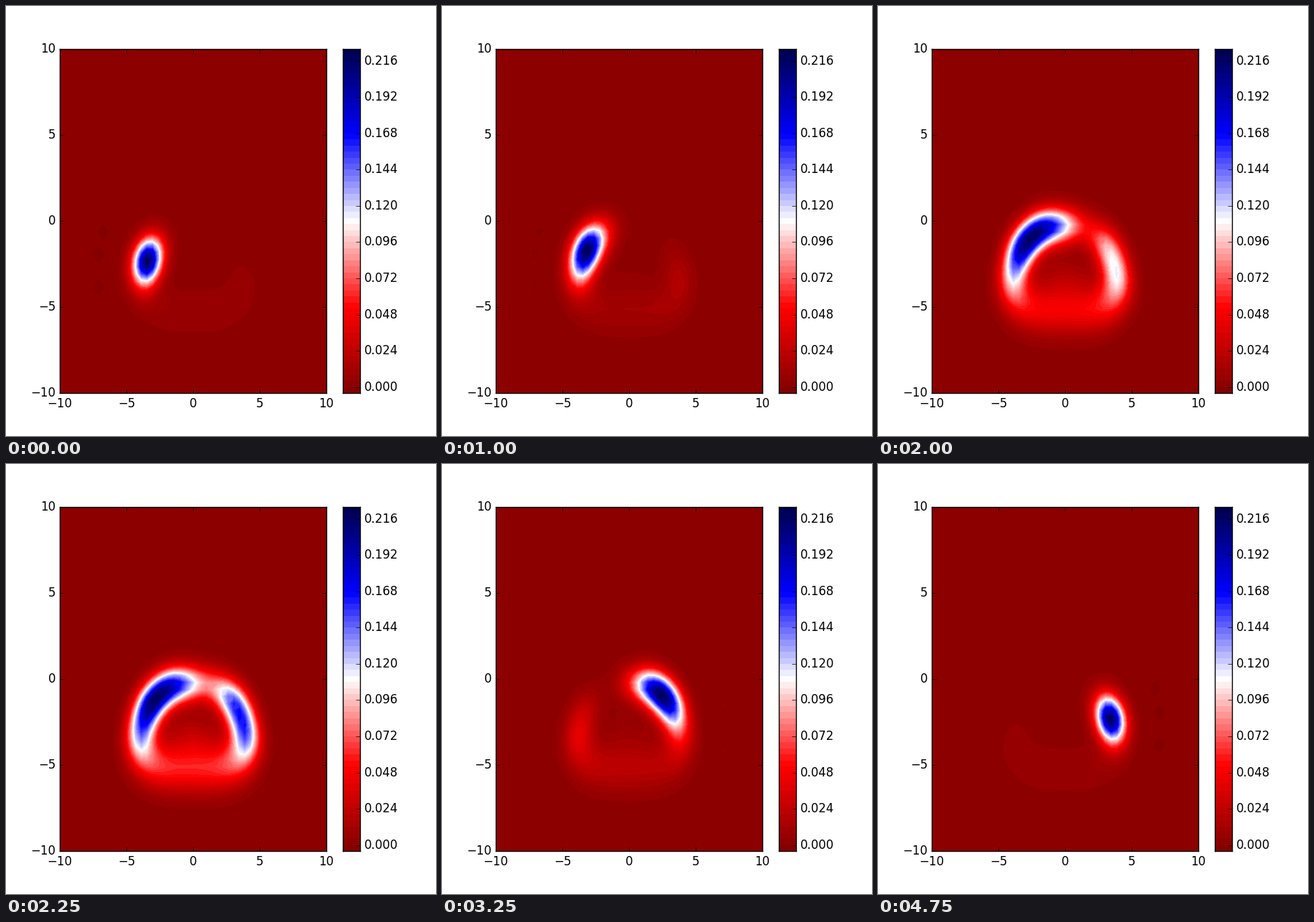
These frames come from a looping animation (600x600 px, 5 s). A matplotlib script:

```python
import numpy as np
import matplotlib.pyplot as plt
from matplotlib.animation import FuncAnimation

plt.rcParams.update({
    "font.family": "DejaVu Sans", "font.size": 12, "axes.linewidth": 1.0,
    "xtick.direction": "in", "ytick.direction": "in",
    "xtick.major.size": 4, "ytick.major.size": 4,
    "xtick.major.width": 0.5, "ytick.major.width": 0.5,
    "xtick.major.pad": 4, "ytick.major.pad": 4,
    "xtick.top": True, "ytick.right": True,
    "ytick.alignment": "center", "text.kerning_factor": 6,
})

FRAMES, INTERVAL = 20, 250
STEP, PEAK = 0.004, 0.2225
LEVELS = STEP * np.arange(-1, 57)
MIDS = (LEVELS[:-1] + LEVELS[1:]) / 2
SPAN = dict(vmin=LEVELS[0], vmax=LEVELS[-1], cmap="seismic_r")

axis = np.linspace(-10, 10, 50)
X, Y = np.meshgrid(axis, axis)

# Ridge of the ring: left half from the top to the bottom, then mirrored
HALF = np.array([(0, -.25), (-.6, -.25), (-1.4, -.32), (-2.1, -.67),
                 (-2.9, -1.3), (-3.4, -2.2), (-3.77, -3.25), (-3.8, -3.9),
                 (-3.45, -4.65), (-2.3, -5.2), (-1, -5.3), (0, -5.3)])
loop = np.vstack([HALF, HALF[-2::-1] * (-1, 1)])
arc = np.r_[0, np.cumsum(np.hypot(*np.diff(loop, axis=0).T))]
LENGTH = arc[-1]
U = np.linspace(0, LENGTH, 240, endpoint=False)
RX, RY = np.interp(U, arc, loop[:, 0]), np.interp(U, arc, loop[:, 1])
WIDTH = 0.7 + 0.24 / (1 + np.exp((RY + 4.4) / 0.3))

# Shape of the distribution at a few moments of the sweep
KEYS = [0, 4, 6, 8, 9]
SHAPE = {
    "wide": [1, 1.02, 1.03, 1.06, 1.07],
    "pos": [4.35, 3.7, 2.6, 3.1, 3.3],
    "up": [.95, 1.45, 2.0, 3.7, 3.8],
    "down": [.95, 1.45, 2.1, 2.4, 2.5],
    "power": [2, 2, 2.2, 3.1, 3.1],
    "lobe": [.0002, .011, .034, .11, .175],
    "lobe_pos": [5.2, 4.9, 4.6, 4.0, 3.8],
    "lobe_up": [1.4, 1.5, 1.6, 1.75, 2.1],
    "lobe_down": [1.8, 2.0, 2.2, 2.5, 2.5],
    "bridge": [.0068, .0105, .019, .045, .055],
    "fill": [.0001, .003, .008, .018, .024],
    "ripple": [.0035, .002, .0015, .0002, .0001],
}
LOGS = {"lobe", "bridge", "fill"}
RIPPLES = [(-7.1, -3.85), (-7.1, -1.95), (-6.73, -.62)]


def shape_at(k):
    return {name: np.exp(np.interp(k, KEYS, np.log(v))) if name in LOGS
            else np.interp(k, KEYS, v) for name, v in SHAPE.items()}


def bump(d, up, down, power):
    """Sharp towards the top of the ring (d < 0), long-tailed below."""
    d = (d + LENGTH / 2) % LENGTH - LENGTH / 2
    return np.where(d < 0, np.exp(-np.abs(d / up) ** power),
                    np.exp(-np.abs(d / down) ** 1.75))


def ramp(t):
    return 1 / (1 + np.exp(-t / 0.4))


def spot(x, y, sx, sy):
    return np.exp(-((X - x) / sx) ** 2 / 2 - ((Y - y) / sy) ** 2 / 2)


def ring(weight, wide):
    dx, dy = X[..., None] - wide * RX, Y[..., None] - RY
    kernel = np.exp(-(dx ** 2 + dy ** 2) / (2 * WIDTH ** 2))
    return kernel @ (weight / WIDTH) * LENGTH / len(U) / np.sqrt(2 * np.pi)


def density(k):
    if k >= FRAMES // 2:
        return density(FRAMES - 1 - k)[:, ::-1]
    s = shape_at(k)
    main = ring(bump(U - s["pos"], s["up"], s["down"], s["power"]), s["wide"])
    lobe = bump(LENGTH - U - s["lobe_pos"], s["lobe_up"], s["lobe_down"], 2.8)
    bridge = ramp(U - 5.7) * ramp(LENGTH - U - 5)
    z = PEAK * main / main.max()
    z += ring(s["lobe"] * lobe + s["bridge"] * bridge, s["wide"])
    z += s["fill"] * spot(0, -3.6, 1.5, 1.0)
    z *= (PEAK - 0.001) / z.max()
    for x, y in RIPPLES:
        z -= s["ripple"] * spot(x, y, 0.28, 0.28)
    return z + 0.001


fig = plt.figure(figsize=(6, 6), dpi=100, facecolor="white")
ax = fig.add_axes([0.125, 0.1, 0.62, 0.8])
cax = fig.add_axes([0.78375, 0.1, 0.04, 0.8])

cax.pcolormesh([0, 1], LEVELS, MIDS[:, None], **SPAN)
cax.set(xlim=(0, 1), ylim=(LEVELS[0], LEVELS[-1]), xticks=[])
ticks = 0.024 * np.arange(10)
cax.set_yticks(ticks, [f"{t:.3f}" for t in ticks])
cax.tick_params(axis="y", left=False, right=True,
                labelleft=False, labelright=True)

shown = []


def draw(k):
    while shown:
        shown.pop().remove()
    shown.append(ax.contourf(X, Y, density(k), levels=LEVELS, **SPAN))
    ax.set(xlim=(-10, 10), ylim=(-10, 10),
           xticks=range(-10, 11, 5), yticks=range(-10, 11, 5))
    return shown


def start():
    return draw(0)


anim = FuncAnimation(fig, draw, frames=FRAMES, init_func=start,
                     interval=INTERVAL, repeat=True, repeat_delay=0)
plt.show()
```
